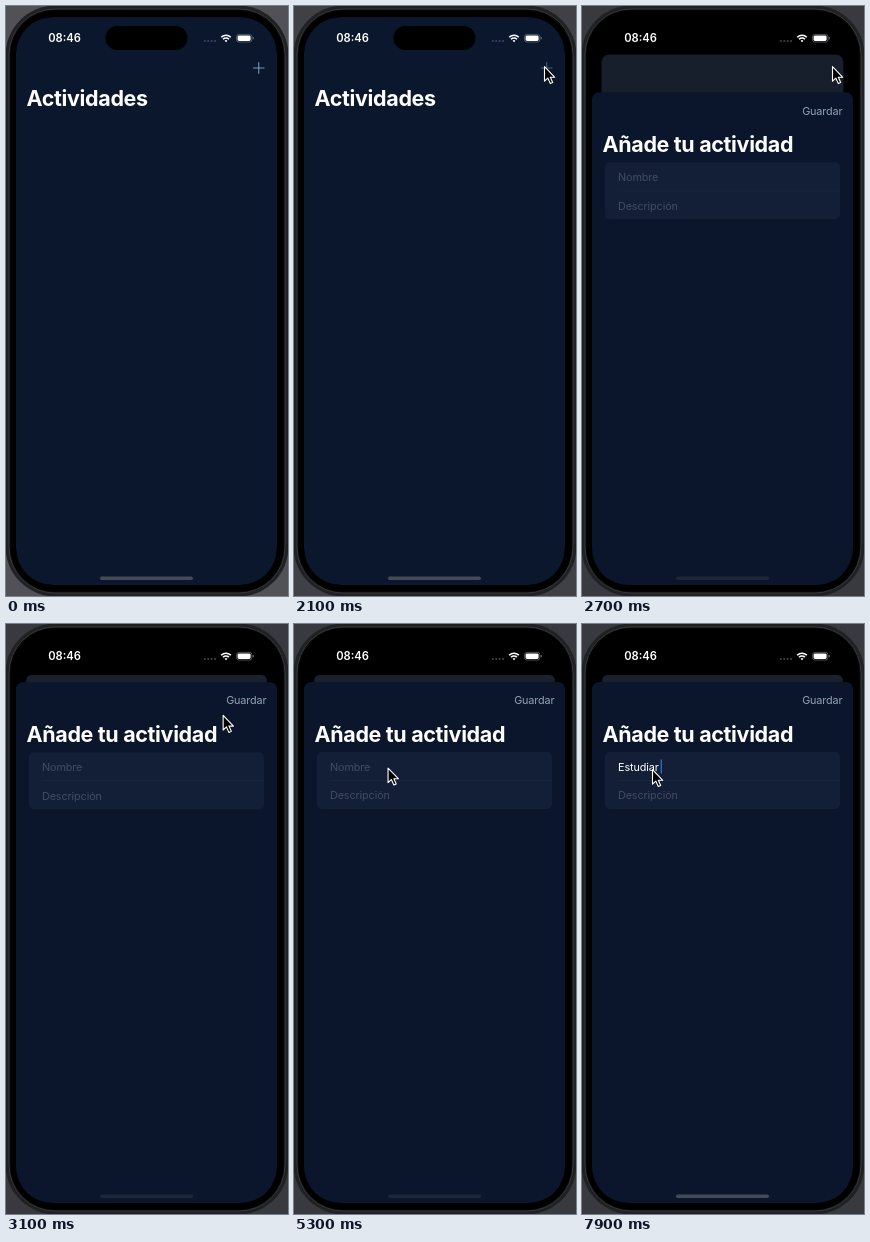
These frames come from a looping animation (282 px wide and 590 px high, 8 s). An HTML page:

```html
<!DOCTYPE html>
<html lang="es">
<head>
<meta charset="utf-8">
<title>Actividades</title>
<style>
  html, body { margin: 0; width: 100%; height: 100%; overflow: hidden; background: #000; }
  svg { display: block; width: 282px; height: 590px; }
  text { font: 400 10.8px Inter, Roboto, sans-serif; letter-spacing: -.01em; font-optical-sizing: none; }
  .title { font-size: 21.5px; font-weight: 700; letter-spacing: -.016em; fill: #fff; }
  .clock { font-size: 11.2px; font-weight: 600; letter-spacing: 0; fill: #fff; }
  .hint { fill: #424c60; }
</style>
</head>
<body>
<svg viewBox="0 0 282 590">
  <defs>
    <clipPath id="screen"><rect x="10" y="11" width="261" height="568" rx="37"/></clipPath>
  </defs>

  <!-- phone body -->
  <rect id="desk" width="282" height="590"/>
  <rect x="-.5" y="-.5" width="283" height="591" rx="50" fill="#202123"/>
  <rect x="3" y="3" width="276" height="584" rx="46" fill="#0a0a0b" stroke="#37383b"/>
  <rect x="4.5" y="4.5" width="273" height="581" rx="44" fill="#000"/>

  <g clip-path="url(#screen)">
    <g id="home">
      <rect id="homeBg" x="10" y="11" width="261" height="568" fill="#0a172c"/>
      <text class="title" x="20.5" y="99.8">Actividades</text>
      <path id="plus" d="M247 62h11.5M252.75 56.2v11.6" stroke="#6d9db6" stroke-width="1.1"/>
      <rect id="dim" x="10" y="11" width="261" height="568" fill="#1e222c"/>
    </g>
    <g id="sheet">
      <rect x="10" width="261" height="640" rx="7" fill="#0b162c"/>
      <text x="260.5" y="22.3" text-anchor="end" fill="#8fa3b5">Guardar</text>
      <text class="title" x="20.5" y="60">Añade tu actividad</text>
      <rect x="23" y="70" width="235" height="57" rx="5" fill="#121f37"/>
      <path d="M36 98.5H258" stroke="#1b273c" stroke-width=".8"/>
      <text id="name" x="36" y="88.7"></text>
      <text class="hint" x="36" y="117.4">Descripción</text>
      <rect id="caret" y="77.5" width="1.3" height="14" fill="#2f6fd0"/>
    </g>
    <rect id="bar" x="94" y="570.5" width="93" height="3.4" rx="1.7" fill="#6b6f76"/>
  </g>

  <!-- status bar -->
  <rect x="99.5" y="20" width="82" height="24" rx="12" fill="#000"/>
  <text class="clock" x="42.2" y="36.2">08:46</text>
  <path d="M198 35h12" stroke="#4a5260" stroke-width="1.7" stroke-dasharray="1.7 1.7"/>
  <g fill="none" stroke="#fff" stroke-width="1.6">
    <path d="M215.2 31.2a6.9 6.9 0 0 1 9.6 0M217 33.3a4.3 4.3 0 0 1 6 0"/>
    <path d="M218.6 34.7a2 2 0 0 1 2.8 0l-1.4 1.5z" fill="#fff" stroke="none"/>
  </g>
  <rect x="230.5" y="28.4" width="15.4" height="7.6" rx="2.3" fill="none" stroke="#6b7280" stroke-width=".7"/>
  <rect x="231.6" y="29.4" width="13" height="5.6" rx="1.4" fill="#fff"/>
  <path d="M247.2 31v2.4" stroke="#6b7280"/>

  <path id="cursor" d="M.5 .6V15.2L3.8 12.1 6.3 17.6 8.7 16.5 6.3 11.3H10.8Z"
        fill="#000" stroke="#fff" stroke-width="1.1" stroke-linejoin="round"/>
</svg>

<script>
const LOOP = 8000, TICK = 100;
const SHEET_START = 2394.6, SPRING = 0.0152;
const TYPE_START = 6760, KEY_GAP = 130, WORD = 'Estudiar';

const $ = id => document.getElementById(id);
const set = (id, attrs) => {
  for (const key in attrs) $(id).setAttribute(key, attrs[key]);
};
const mix = (a, b, k) => a + (b - a) * k;
const ramp = (t, from, to) => Math.min(1, Math.max(0, (t - from) / (to - from)));
const easeOut = k => 1 - (1 - k) ** 2;

// Critically damped spring from 0 to 1
const spring = ms => {
  const x = Math.max(0, ms) * SPRING;
  return 1 - (1 + x) * Math.exp(-x);
};

const entry = { x: 63, y: 385 }, plusStop = { x: 250, y: 60 };
const formStop = { x: 165, y: 138 }, nameStop = { x: 70, y: 145 };
const moves = [
  { start: 800, end: 1500, from: entry, to: plusStop, bend: { x: 271, y: 191 } },
  { start: 2900, end: 3800, from: plusStop, to: formStop, bend: { x: 208, y: 99 } },
  { start: 4900, end: 5700, from: formStop, to: nameStop, bend: { x: 117, y: 142 } }
];

// Slowing motion along a quadratic curve
function pointerAt(t) {
  const move = moves.findLast(m => t >= m.start) || moves[0];
  const k = easeOut(ramp(t, move.start, move.end));
  const along = axis =>
    mix(mix(move.from[axis], move.bend[axis], k), mix(move.bend[axis], move.to[axis], k), k);
  return `translate(${along('x')} ${along('y')})`;
}

function drawSheet(t) {
  const p = spring(t - SHEET_START);
  const rx = mix(37, 6, p);
  set('home', {
    transform: `translate(140.5 ${11 + 40 * p}) scale(${1 - .0785 * p}) translate(-140.5 -11)`
  });
  set('homeBg', { rx });
  set('dim', { rx, opacity: .8 * p });
  set('plus', { opacity: mix(1, .4, ramp(t, 1600, 2300)) });
  set('sheet', { transform: `translate(0 ${579 - 521 * p})`, opacity: p > 0 ? 1 : 0 });
  set('bar', { opacity: .6 - .42 * (ramp(t, 2400, 2500) - ramp(t, 5400, 5800)) });
}

function drawField(t) {
  const typed = WORD.slice(0, Math.max(0, Math.floor((t - TYPE_START) / KEY_GAP) + 1));
  const name = $('name');
  name.textContent = typed || 'Nombre';
  set('name', { fill: typed ? '#fff' : '#424c60' });
  const blink = Math.sin(Math.PI * ramp(t, 6000, 6500));
  set('caret', {
    x: 36 + (typed && name.getComputedTextLength() + 2),
    opacity: t < 5800 ? 0 : 1 - blink
  });
}

function draw(t) {
  drawSheet(t);
  drawField(t);
  const grey = mix(80, 56, ramp(t, 1600, 2300));
  set('desk', { fill: `rgb(${grey},${grey + 2},${grey + 8})` });
  set('cursor', { transform: pointerAt(t), opacity: t < 800 ? 0 : 1 });
}

const start = performance.now();
function frame() {
  const t = (performance.now() - start) % LOOP;
  draw(Math.floor(t / TICK) * TICK);
  requestAnimationFrame(frame);
}
frame();
</script>
</body>
</html>
```
